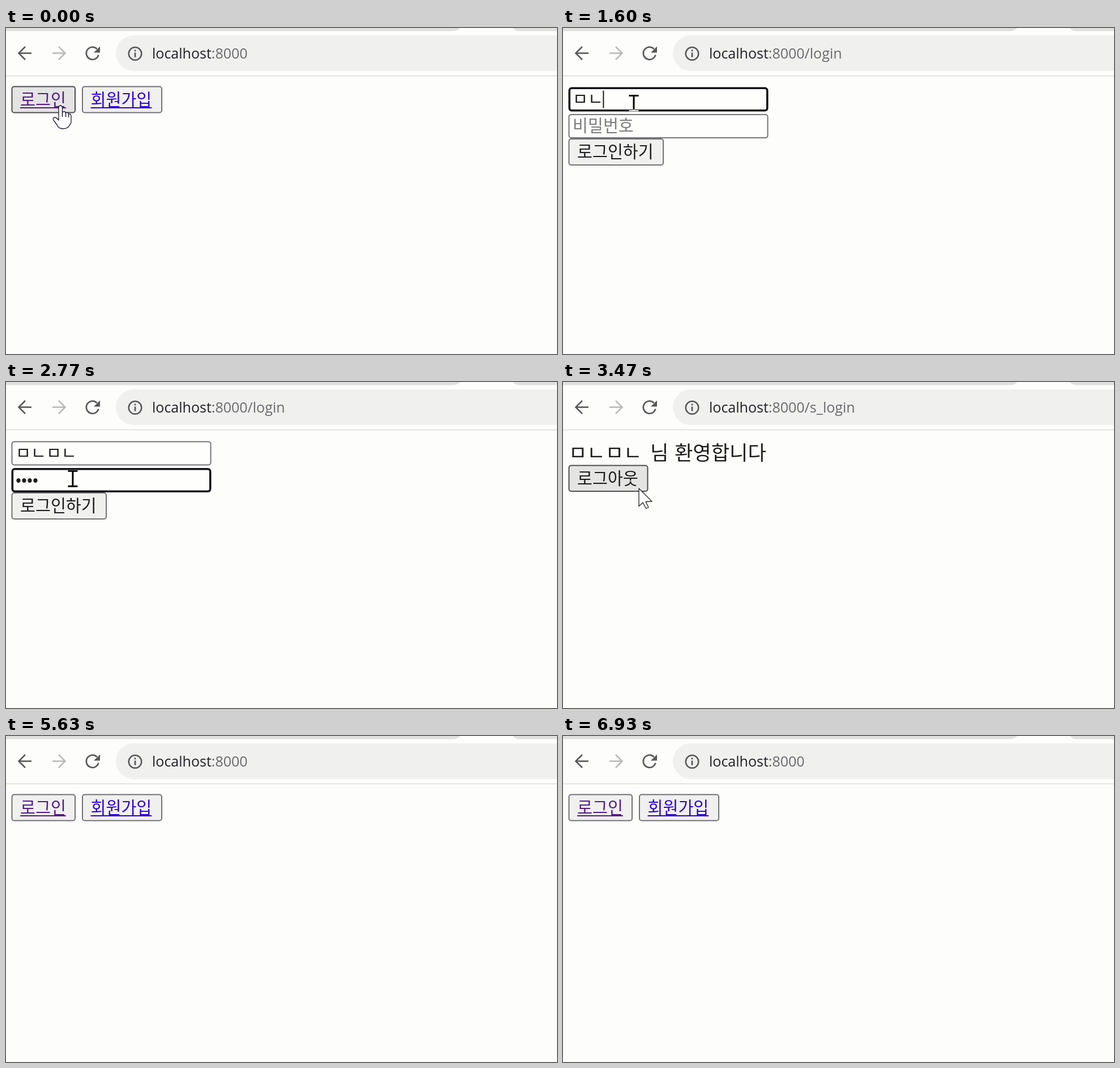
These frames come from a looping animation (973 by 576 pixels, 6960 ms). An HTML page with a canvas:

```html
<!DOCTYPE html>
<html lang="ko">
<head>
<meta charset="utf-8">
<style>
  html, body { margin: 0; width: 100%; height: 100%; overflow: hidden; background: #fdfdfb; }
  canvas { display: block; }
</style>
</head>
<body>
<canvas id="stage" width="973" height="576"></canvas>
<script>
const ctx = document.getElementById('stage').getContext('2d');
const LOOP = 6960;
const KOREAN = '"Noto Sans CJK KR Light", "Noto Sans CJK KR DemiLight", "Noto Sans CJK KR", "Noto Sans CJK", sans-serif';
const LATIN = '"Open Sans", "Noto Sans", sans-serif';
const USER = 'ㅁㄴㅁㄴ';
const INK = '#1c1c1c', GREY = '#7c7c7c', ICON = '#58585a';

// Moments at which the page or a control changes
const AT = { login: 600, focusId: 1150, typeId: 1350, focusPw: 2090, typePw: 2280,
             submit: 2930, welcome: 3020, logout: 4520, home: 4750, gone: 5450 };
const KEY_GAP = 130;

// Pointer stops: time, x, y
const PATH = [
  [0, 96, 137], [600, 96, 137], [850, 125, 133], [1850, 125, 133], [2080, 113, 157],
  [2700, 113, 157], [2900, 130, 205], [3120, 130, 205], [3350, 134, 188],
  [4150, 134, 188], [4420, 123, 167], [4980, 123, 167], [5150, 112, 135],
  [5300, 160, 70], [5450, 250, -40]
];

function pointerAt(t) {
  const i = PATH.findIndex(p => p[0] > t);
  if (i < 0) return { x: -99, y: -99 };
  const [t0, x0, y0] = PATH[i - 1], [t1, x1, y1] = PATH[i];
  const u = (t - t0) / (t1 - t0), k = u * u * (3 - 2 * u);
  return { x: x0 + (x1 - x0) * k, y: y0 + (y1 - y0) * k };
}

const within = (p, x, y, w, h) => p.x >= x && p.x <= x + w && p.y >= y && p.y <= y + h;
const typed = (t, start) => Math.max(0, Math.min(4, Math.floor((t - start) / KEY_GAP) + 1));

function text(str, x, y, size, color, family = KOREAN) {
  ctx.font = `${family === KOREAN ? 300 : 400} ${size}px ${family}`;
  ctx.fillStyle = color;
  ctx.fillText(str, x, y);
  return ctx.measureText(str).width;
}

function line(color, width, ...pts) {
  ctx.beginPath();
  for (let i = 0; i < pts.length; i += 2) ctx.lineTo(pts[i], pts[i + 1]);
  ctx.strokeStyle = color;
  ctx.lineWidth = width;
  ctx.stroke();
}

function box(x, y, w, h, fill, stroke, width = 2) {
  ctx.beginPath();
  ctx.roundRect(x + width / 2, y + width / 2, w - width, h - width, 4);
  ctx.fillStyle = fill;
  ctx.fill();
  ctx.strokeStyle = stroke;
  ctx.lineWidth = width;
  ctx.stroke();
}

function shape(d, x, y, fill, stroke) {
  const p = new Path2D(d);
  ctx.save();
  ctx.translate(x, y);
  ctx.fillStyle = fill;
  ctx.fill(p);
  if (stroke) {
    ctx.strokeStyle = stroke;
    ctx.lineWidth = 1.3;
    ctx.lineJoin = 'round';
    ctx.stroke(p);
  }
  ctx.restore();
}

function button(label, x, y, w, h, p, pressed, link) {
  const hover = within(p, x, y, w, h);
  box(x, y, w, h, pressed ? '#f4f4f3' : hover ? '#e4e4e3' : '#f0f0ef',
      pressed ? '#929294' : hover ? '#4e4e50' : '#727274');
  const width = text(label, x + 15.5, y + 34, 29.3, link || INK);
  if (link) line(link, 2, x + 15.5, y + 38.5, x + 15.5 + width, y + 38.5);
  return hover;
}

function input(value, hint, x, y, p, focused, t) {
  const w = 353, h = 43, hover = within(p, x, y, w, h);
  box(x, y, w, h, '#fefefd', focused ? '#101014' : hover ? '#3c3c40' : '#757578', focused ? 3.6 : 2);
  const width = text(value || hint, x + 7.5, y + 31, 29.3, value ? INK : GREY);
  if (focused && t % 1060 < 530) {
    const cx = x + 8 + (value ? width : 0);
    line(INK, 2, cx, y + 6, cx, y + 37);
  }
  return hover;
}

function toolbar(path) {
  shape('M0 0H802Q798 5.5 787 5.5H0Z M895 0H973V5.5H908Q899 5.5 895 0Z', 0, 0, '#e0e0de');
  line('#dadad8', 1.5, 0, 84.5, 973, 84.5);
  ctx.beginPath();
  ctx.roundRect(194, 13, 840, 63, 31.5);
  ctx.fillStyle = '#f0f0ef';
  ctx.fill();

  line(ICON, 2.6, 45, 44.5, 23, 44.5);
  line(ICON, 2.6, 34, 33, 22.5, 44.5, 34, 56);
  line('#bababa', 2.6, 82, 44.5, 104, 44.5);
  line('#bababa', 2.6, 93, 33, 104.5, 44.5, 93, 56);

  ctx.strokeStyle = ICON;
  ctx.lineWidth = 2.7;
  ctx.beginPath();
  ctx.arc(152.8, 44.7, 11, 0.28, 5.5);
  ctx.stroke();
  shape('M0 0V11H-11Z', 166, 32.5, ICON);

  ctx.lineWidth = 2.5;
  ctx.beginPath();
  ctx.arc(228, 45.3, 11.3, 0, 7);
  ctx.stroke();
  line(ICON, 2.8, 228, 43.5, 228, 51.5);
  line(ICON, 2.8, 228, 38.5, 228, 41.3);

  const w = text('localhost', 258, 53.5, 25, '#202024', LATIN);
  text(':8000' + path, 258 + w, 53.5, 25, '#6a6a6c', LATIN);
}

function homePage(t, p) {
  const pressed = t > 470 && t < AT.login;
  const a = button('로그인', 9.5, 102.5, 113.5, 48, p, pressed, '#551a8b');
  const b = button('회원가입', 134, 102.5, 142, 48, p, false, '#2c00dc');
  return a || b ? 'hand' : 'arrow';
}

function loginPage(t, p) {
  // The form settles slightly higher once the first field has content
  const y = t < AT.typeId ? 107 : 104.5;
  const id = USER.slice(0, typed(t, AT.typeId));
  const pw = '•'.repeat(typed(t, AT.typePw));
  const idFocus = t >= AT.focusId && t < AT.focusPw;
  const pwFocus = t >= AT.focusPw && t < AT.submit;
  const a = input(id, '아이디', 9.5, y, p, idFocus, t - AT.focusId);
  const b = input(pw, '비밀번호', 9.5, y + 47.5, p, pwFocus, t - AT.focusPw);
  button('로그인하기', 9.5, y + 90.5, 168.5, 48, p, t > AT.submit);
  return a || b ? 'beam' : 'arrow';
}

function welcomePage(t, p) {
  text(USER, 10, 138, 35.2, INK);
  text('님', 154, 138, 35.2, INK);
  text('환영합니다', 197, 138, 35.2, INK);
  button('로그아웃', 9.5, 146.5, 141, 47.5, p, t > AT.logout);
  return 'arrow';
}

const cursors = {
  arrow: (x, y) => shape('M0 0V31.5L7 25L12.5 35.5L17 33.5L12 23.5L23 23Z', x, y, '#fff', '#222226'),
  hand: (x, y) => {
    shape('M-3 4Q-3 0 0 0T3.5 4V12Q8 9 9.5 13Q13 11 14.5 15Q19 14 19 19V27Q19 32 16 35' +
          'Q14 41 3 41Q-4 40 -6 34L-12 26Q-14 21 -10 21Q-7 21 -3 26Z', x, y, '#fff', '#181828');
    line('#181828', 1.4, x + 3.5, y + 11, x + 3.5, y + 20);
    line('#181828', 1.4, x + 9.5, y + 13, x + 9.5, y + 20);
    line('#181828', 1.4, x + 14.5, y + 15, x + 14.5, y + 21);
  },
  beam: (x, y) => {
    ctx.save();
    ctx.globalCompositeOperation = 'difference';
    shape('M-8.5 -15H8.5V-12H1.5V12H8.5V15H-8.5V12H-1.5V-12H-8.5Z', x, y, '#fff');
    ctx.restore();
  }
};

function draw(now) {
  const t = now % LOOP, p = pointerAt(t);
  ctx.fillStyle = '#fdfdfb';
  ctx.fillRect(0, 0, 973, 576);
  const [path, page] =
    t < AT.login || t >= AT.home ? ['', homePage] :
    t < AT.welcome ? ['/login', loginPage] : ['/s_login', welcomePage];
  toolbar(path);
  const cursor = page(t, p);
  if (t < AT.gone) cursors[cursor](p.x, p.y);
  requestAnimationFrame(draw);
}
requestAnimationFrame(draw);
</script>
</body>
</html>
```
